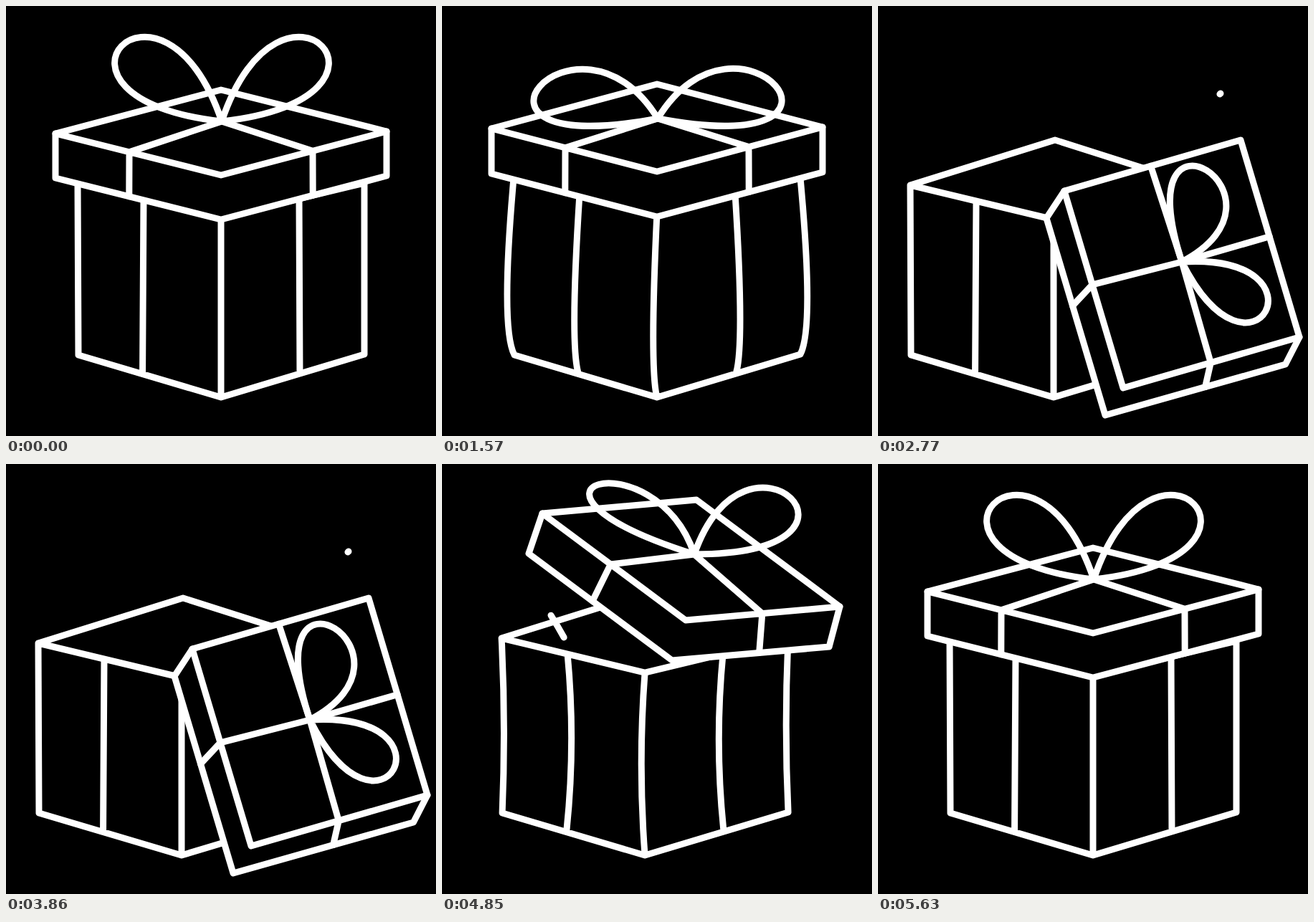
Write an HTML page that moves like this. It is 600x600 px and loops after 5.66 s.

```html
<!DOCTYPE html>
<html lang="en">
<head>
<meta charset="utf-8">
<title>Gift box</title>
<style>
  html, body { margin: 0; width: 100%; height: 100%; overflow: hidden; background: #000; }
  svg { display: block; width: 100%; height: 100%; }
  svg * { fill: none; stroke: #fff; stroke-width: 9; stroke-linecap: round; stroke-linejoin: round; }
  #lid { fill: #000; }
</style>
</head>
<body>
<svg viewBox="0 0 600 600">
  <path id="body"/>
  <path id="streak" pathLength="100" d="M185 270C150 200 95 120 11 40"/>
  <circle id="ring" cx="153.5" cy="81.5"/>
  <path id="rays"/>
  <path id="lid"/>
  <path id="trim"/>
  <path id="bow"/>
  <path id="arc" pathLength="100" d="M221 290C200 110 270 15 400 15C475 15 531 60 531 110C531 140 515 152 505 155C480 162 462 135 478 122"/>
</svg>
<script>
const STEP = 30, STEPS = 60, OPEN = 1030, CLOSE = 3860, LOOP = 5660;
const LAUNCH_AT = 19, LAND_AT = 33;

// Lid poses: back, left and front corner, depth, knot, then two handles per bow loop.
const CLOSED = [[300, 117], [69, 178], [300, 236], [0, 62], [301, 161], [-83, -248], [-290, -32], [83, -248], [290, -32]];
const LAUNCH = [[300, 109], [69, 171], [300, 231], [0, 63], [301, 157], [-112, -182], [-326, 62], [112, -184], [326, 62]];
const FLIGHT = [[355, 50], [140, 69], [340, 218], [-19, 56], [352, 126], [-55, -165], [-300, -95], [72, -209], [287, 0]];
const OPENED = [[506, 187], [260, 258], [342, 533], [-25, 38], [424, 357], [174, -90], [-80, -250], [213, -12], [97, 198]];

const el = id => document.getElementById(id);
const line = (...pts) => 'M' + pts.join('L');
const add = (p, q) => [p[0] + q[0], p[1] + q[1]];
const mix = (p, q, t) => [p[0] + (q[0] - p[0]) * t, p[1] + (q[1] - p[1]) * t];
const ramp = (k, from, to) => Math.max(0, Math.min(1, (k - from) / (to - from)));
const show = (id, on) => { el(id).style.display = on ? '' : 'none'; };

// Parabola through three poses, as in free flight.
const fly = (a, b, c, u) => a.map((p, n) => p.map((v, i) =>
  v * (1 - u) * (1 - 2 * u) + b[n][i] * 4 * u * (1 - u) + c[n][i] * u * (2 * u - 1)));

const turn = ([x, y], deg) => {
  const r = deg * Math.PI / 180, c = Math.cos(r), s = Math.sin(r);
  return [x * c - y * s, x * s + y * c];
};

const crouch = k => 18 * Math.sin(Math.PI * ramp(k, 0, LAUNCH_AT));
const bounce = k => -72 * ramp(k, LAND_AT, 45) * (1 - ramp(k, LAND_AT, 45));
const swing = k => k < 31 ? 0 : -52 * Math.exp((31 - k) / 6) * Math.sin(Math.PI * (k - 31) / 6.6);

function lidPose(k) {
  const rise = ramp(k, 0, LAUNCH_AT) ** 2;
  const pose = k < LAUNCH_AT
    ? CLOSED.map((p, n) => mix(p, LAUNCH[n], rise))
    : fly(LAUNCH, FLIGHT, OPENED, ramp(k, LAUNCH_AT, LAND_AT));
  const hop = [0, crouch(k) + bounce(k)];
  return pose.map((p, n) => n > 4 ? turn(p, swing(k)) : n === 3 ? p : add(p, hop));
}

function drawLid(k) {
  const [T, L, F, D, K, ...bow] = lidPose(k);
  const R = [T[0] + F[0] - L[0], T[1] + F[1] - L[1]];
  const L2 = add(L, D), F2 = add(F, D), R2 = add(R, [D[0] * 0.78, D[1]]);
  el('lid').setAttribute('d', line(T, L, L2, F2, R2, R) + 'Z');

  const tilt = ramp(k, 19, 26), grow = ramp(k, 27, 33);
  let d = line(L, F, R) +
    line(K, mix(L, F, 0.446 + 0.03 * tilt), mix(L2, F2, 0.445)) +
    line(K, mix(R, F, 0.446 + 0.057 * tilt), mix(R2, F2, 0.445));
  if (grow) d += line(K, mix(K, mix(L, T, 0.49), grow)) + line(K, mix(K, mix(T, R, 0.49), grow));
  el('trim').setAttribute('d', d);

  const loop = (a, b) => `M${K}c${a} ${b} 0 0`;
  el('bow').setAttribute('d', loop(bow[0], bow[1]) + loop(bow[2], bow[3]));
}

function drawBody(k) {
  const fade = 1 - ramp(k, 22, 35);
  const dx = -55 * ramp(k, LAUNCH_AT, LAND_AT) ** 1.7;
  const dy = (crouch(k) - 7 * ramp(k, 0, LAUNCH_AT) ** 2 - 3) * fade;
  const wobble = phase => 16 * fade * Math.sin(Math.PI * phase / 24);
  const edge = wobble(k), ribbon = wobble(k * 1.1), lean = -7 * fade * ramp(k, 10, 22);
  const belly = 0.85 - 0.35 * ramp(k, 19, 26);

  const rim = (x, y) => [x + dx, y + dy], base = (x, y) => [x + dx, y];
  const L = rim(100, 250), T = rim(302, 187), R = rim(500, 250), F = rim(300, 298);
  const l = base(101, 487), f = base(300, 546), r = base(500, 486);
  const post = (p, q, bend) => `M${p}Q${add(mix(p, q, belly), [2 * bend, 0])} ${q}`;
  el('body').setAttribute('d', line(L, T, R, F, L) + line(l, f, r) +
    post(L, l, -edge) + post(F, f, lean) + post(R, r, edge) +
    post(mix(L, F, 0.46), mix(l, f, 0.45), -ribbon) +
    post(mix(R, F, 0.455), mix(r, f, 0.45), ribbon));
}

function drawTrail(id, head, tail) {
  const s = el(id).style;
  show(id, head > 0 && tail < 1);
  s.strokeDasharray = `${Math.max(0.01, 100 * (head - tail))} 1000`;
  s.strokeDashoffset = -100 * tail;
}

function drawSpark(k) {
  const age = k - 35, inner = 26 + 4.25 * age, outer = Math.min(59, 28 + 7.25 * age);
  show('ring', k > 31 && k < 38);
  el('ring').setAttribute('r', 25 * ramp(k, 31, 35));
  el('ring').style.strokeWidth = 9 * (1 - ramp(k, 35, 38));
  show('rays', age >= 0 && inner < outer);
  const ray = (x, y) => line([153.5 + x * inner, 81.5 + y * inner], [153.5 + x * outer, 81.5 + y * outer]);
  el('rays').setAttribute('d', ray(1, 0) + ray(-1, 0) + ray(0, 1) + ray(0, -1));
}

// The box opens step by step, rests, then runs the same steps backwards.
function stepAt(t) {
  if (t < OPEN) return 0;
  if (t < CLOSE) return Math.min(STEPS, Math.floor((t - OPEN) / STEP) + 1);
  return Math.max(0, STEPS - 1 - Math.floor((t - CLOSE) / STEP));
}

function draw(k) {
  drawBody(k);
  drawLid(k);
  drawTrail('streak', ramp(k, 23.2, 35.2), ramp(k, 24.3, 39.8));
  drawTrail('arc', ramp(k, 31, 40.2), ramp(k, 34.4, 59.05));
  drawSpark(k);
}

const start = performance.now();
function tick() {
  draw(stepAt((performance.now() - start) % LOOP));
  requestAnimationFrame(tick);
}
tick();
</script>
</body>
</html>
```
